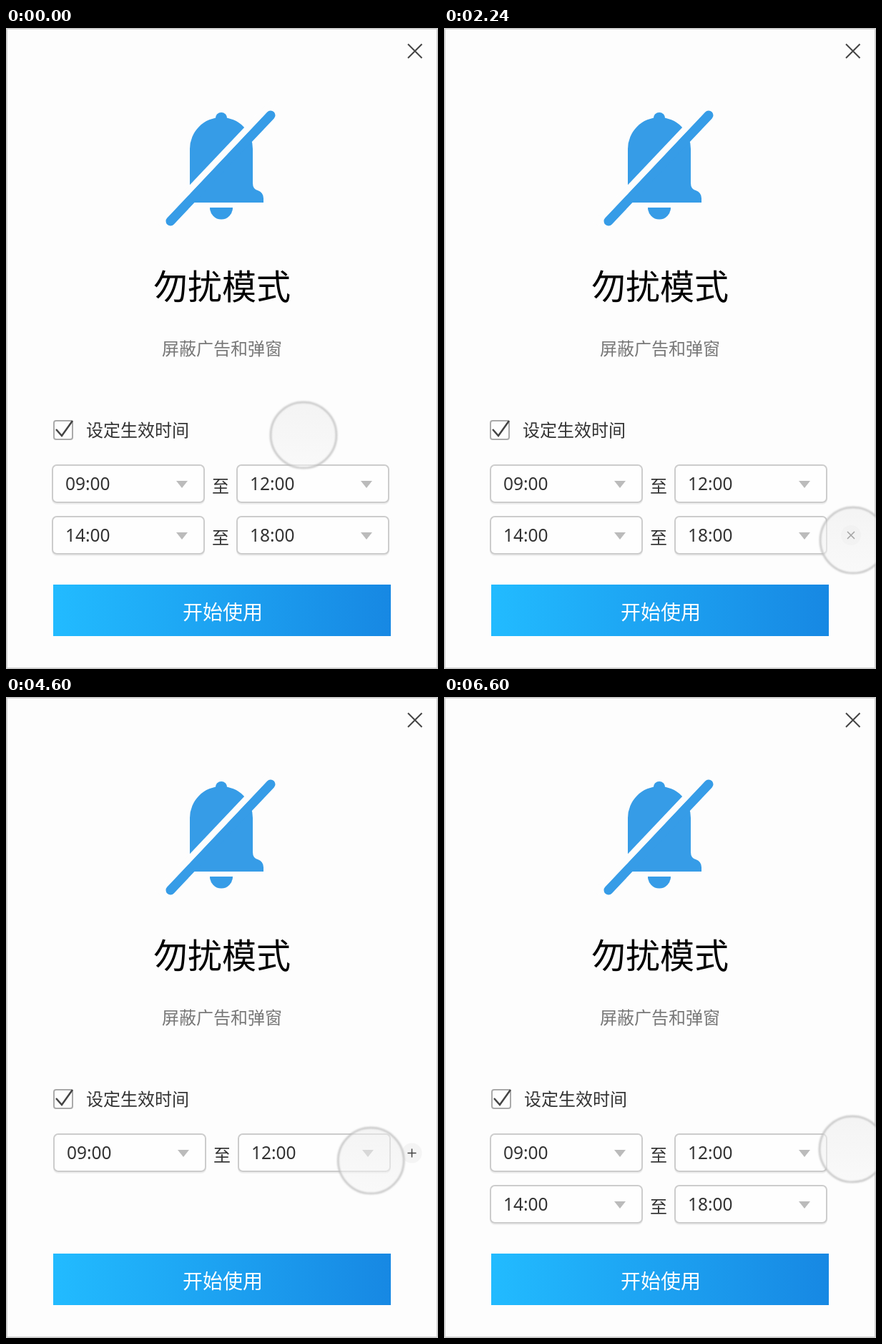
Recreate the animation shown at these times as an HTML page. Size 604 px wide and 896 px high, loop 6620 ms.

```html
<!DOCTYPE html>
<html lang="zh-CN">
<head>
<meta charset="utf-8">
<style>
html, body { margin: 0; width: 100%; height: 100%; overflow: hidden; background: #fdfdfd; }
svg { display: block; width: 604px; height: 896px; }
text { font-family: "Noto Sans CJK SC", "Noto Sans CJK", sans-serif; font-size: 24px; font-weight: 350; fill: #333; }
.time { font-family: "Noto Sans", "Open Sans", sans-serif; font-size: 24.5px; font-weight: 400; }
.mid { text-anchor: middle; }
.line { fill: none; stroke: #444; stroke-width: 2; }
.field { fill: #fefefe; stroke: #ccc; stroke-width: 2; }
</style>
</head>
<body>
<svg viewBox="0 0 604 896">
  <defs>
    <linearGradient id="blue"><stop stop-color="#22bbff"/><stop offset="1" stop-color="#1788e3"/></linearGradient>
    <linearGradient id="glass" x2="0" y2="1"><stop stop-color="#ececec"/><stop offset="1" stop-color="#f6f6f6"/></linearGradient>
    <filter id="soft" x="-20%" y="-20%" width="140%" height="140%"><feGaussianBlur stdDeviation="1"/></filter>
    <g id="box">
      <rect x="1" y="3" width="212" height="52" rx="6" fill="none" stroke="#000" stroke-opacity=".06" stroke-width="2"/>
      <rect class="field" x="1" y="1" width="212" height="52" rx="6"/>
      <path d="M174 23h16l-8 10z" fill="#bbb"/>
    </g>
  </defs>
  <rect x="1" y="1" width="602" height="894" fill="#fdfdfd" stroke="#ccc" stroke-width="2"/>
  <path class="line" d="M562 22.500l19.500 19.500m0-19.500l-19.500 19.500"/>

  <g fill="#369ce7">
    <circle cx="301" cy="126" r="8"/>
    <path d="M257 244V169A44 44 0 0 1 345 169V217Q345 225 352 227 360 230 360 238V244Z"/>
    <path d="M285 251h32a16 16.500 0 0 1-32 0z"/>
    <path d="M212 273.500L372 104.500" stroke="#fdfdfd" stroke-width="9"/>
    <path d="M230 270L370 122" stroke="#369ce7" stroke-width="13" stroke-linecap="round"/>
  </g>

  <text class="mid" x="302" y="379" style="font-size:48px;fill:#000">勿扰模式</text>
  <text class="mid" x="302" y="457" style="fill:#777">屏蔽广告和弹窗</text>

  <g id="label">
    <rect class="field" x="1" y="549" width="26" height="26" rx="3" style="stroke:#aaa"/>
    <path class="line" d="M4 561l8 9 15-21" style="stroke-width:2.500"/>
    <text x="46" y="571">设定生效时间</text>
  </g>

  <g id="row1"></g>
  <g id="row2"></g>

  <g id="remove">
    <circle cx="569" cy="709" r="14" fill="#f4f4f4"/>
    <path class="line" d="M564 704l10 10m0-10l-10 10" style="stroke-width:1.500"/>
  </g>
  <g id="add">
    <circle cx="567.500" cy="637.500" r="14" fill="#f4f4f4"/>
    <path class="line" d="M561.500 637.500h12m-6-6v12" style="stroke-width:1.500"/>
  </g>

  <rect x="66" y="778" width="472" height="72" fill="url(#blue)"/>
  <text class="mid" x="303" y="827" style="font-size:28px;fill:#fff">开始使用</text>

  <g id="touch">
    <circle r="46" fill="url(#glass)" fill-opacity=".55"/>
    <circle r="46" fill="none" stroke="#bbb" stroke-width="2.500" stroke-opacity=".85" filter="url(#soft)"/>
  </g>
</svg>
<script>
const LOOP = 6620, HOVER = 900, DELETE = 2614, HOVER_ADD = 3850, ADD = 5633, SHIFT = 350;
const $ = id => document.getElementById(id);
const place = (id, x, y) => $(id).setAttribute('transform', `translate(${x} ${y})`);

function fillRow(id, from, to) {
  $(id).innerHTML = `<use href="#box"/><use href="#box" x="258"/>
    <text class="time" x="19" y="36">${from}</text>
    <text class="time" x="277" y="36">${to}</text>
    <text class="mid" x="236" y="39">至</text>`;
}
fillRow('row1', '09:00', '12:00');
fillRow('row2', '14:00', '18:00');

// touch moves: start, duration, x, y
const START = [416, 569];
const MOVES = [
  [450, 550, 416, 693],
  [1531, 600, 572, 716],
  [3285, 320, 416, 700],
  [3680, 270, 416, 673],
  [4117, 850, 571, 632]
];

function ease(t, start, length) {
  const p = Math.min(1, Math.max(0, (t - start) / length));
  return (1 - Math.cos(Math.PI * p)) / 2;
}

function draw(t) {
  let [x, y] = START;
  for (const [start, length, tx, ty] of MOVES) {
    const p = ease(t, start, length);
    x += (tx - x) * p;
    y += (ty - y) * p;
  }
  place('touch', x, y);

  const removed = ease(t, DELETE, SHIFT), added = ease(t, ADD, SHIFT);
  const single = t >= DELETE && t < ADD;
  place('label', 66 - 2 * ease(t, HOVER, 200) + 2 * removed, 0);
  place('row1', single ? 64 + 2 * removed : 64, single ? 682 - 72 * removed : 610);
  place('row2', t < DELETE ? 64 : 66 - 2 * added, t < DELETE ? 682 : 610 + 72 * added);
  $('row2').style.display = single ? 'none' : '';
  $('remove').style.opacity = t < DELETE ? ease(t, HOVER, 200) : 0;
  $('add').style.opacity = t < ADD ? ease(t, HOVER_ADD, 200) : 0;
}

const began = performance.now();
function tick() {
  draw((performance.now() - began) % LOOP);
  requestAnimationFrame(tick);
}
tick();
</script>
</body>
</html>
```
